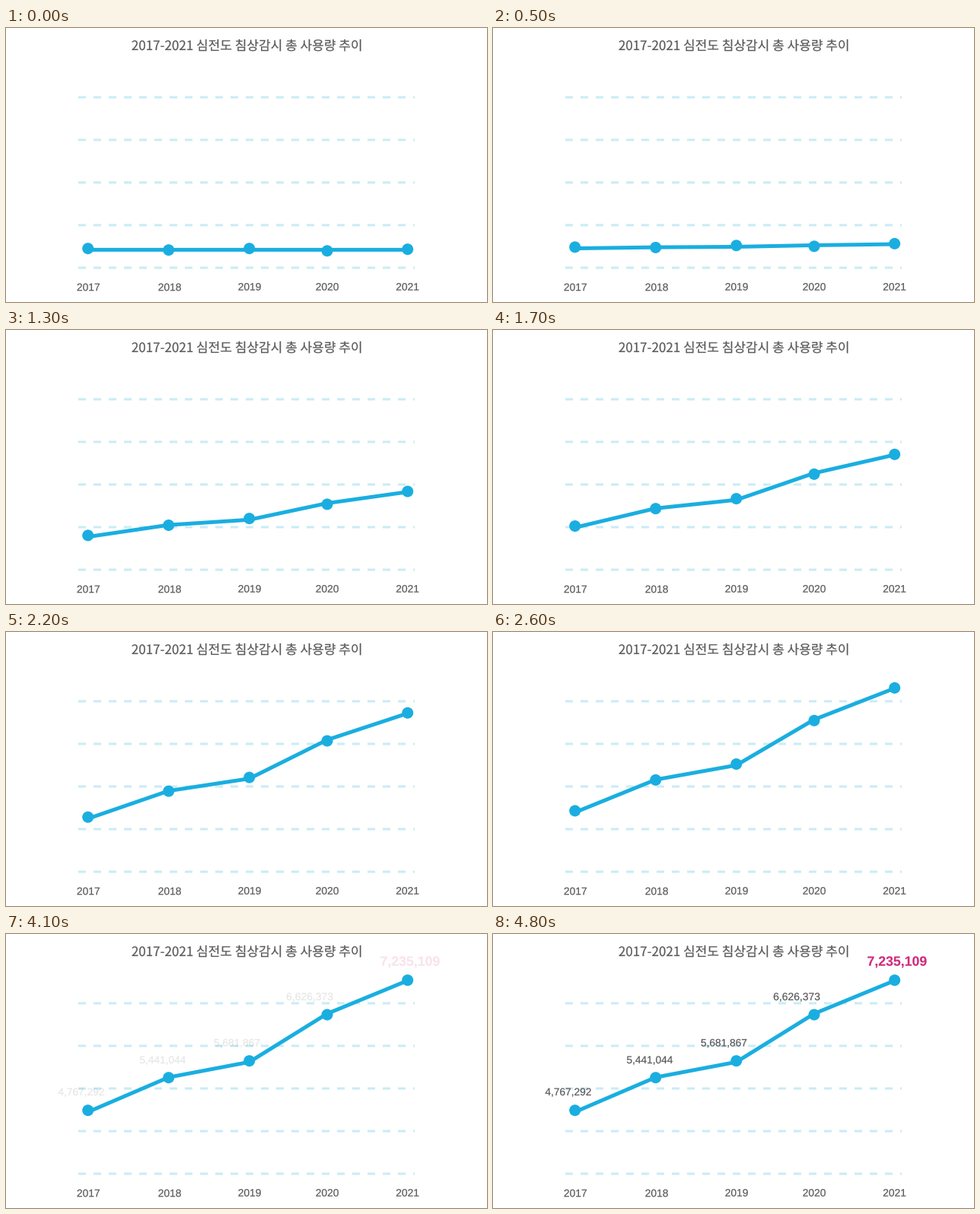
A matplotlib script for the animation above (8 s loop, 632 by 360 pixels).

```python
import numpy as np
import matplotlib.pyplot as plt
from matplotlib.animation import FuncAnimation
from matplotlib.patches import Circle
from matplotlib.patheffects import Stroke

W, H, DPI = 632, 360, 100
STEP, FRAMES = 100, 80
PX = 72 / DPI  # points per pixel

BLUE, PALE, GRAY, PINK = "#1aaee0", "#c9ecf7", "#58595b", "#d12a7b"
HANGUL, LATIN = "Noto Sans CJK JP", "Liberation Sans"

plt.rcParams["text.hinting"] = "none"

X = np.array([107.7, 213.7, 319.7, 422, 527.7])
DOT_FROM = np.array([289.7, 291.7, 289.7, 292.8, 290.7])
DOT_TO = np.array([231.7, 188.7, 166.7, 106, 60.7])
LINE_FROM = np.full(5, 291.4)
LINE_TO = np.array([233.8, 188.3, 168.2, 104.7, 61.2])

fig = plt.figure(figsize=(W / DPI, H / DPI), dpi=DPI, facecolor="white")
ax = fig.add_axes([0, 0, 1, 1])
ax.set_xlim(0, W)
ax.set_ylim(H, 0)
ax.axis("off")


def label(x, y, text, size, font=LATIN, color=GRAY, weight="normal", stroke=0.2):
    t = ax.text(x, y, text, fontsize=size * PX, family=font, color=color,
                weight=weight, ha="center", va="baseline", zorder=5)
    t.set_path_effects([Stroke(linewidth=stroke * PX, foreground=color)])
    return t


# Dashed grid
for y in range(91, 316, 56):
    for x in range(95, 537, 20):
        ax.plot([x, min(x + 10, 537)], [y, y], color=PALE, lw=3 * PX,
                solid_capstyle="butt", snap=False, zorder=1)

label(316.7, 29, "2017-2021 심전도 침상감시 총 사용량 추이", 17, HANGUL)

for x, y, year in zip([108.2, 215, 320, 422, 527.5],
                      [345.2, 345.2, 344.7, 344.7, 344.7], range(2017, 2022)):
    label(x, y, str(year), 13.8)

values = [
    label(99, 212, "4,767,292", 13.7),
    label(206, 170, "5,441,044", 13.7),
    label(303.5, 147.5, "5,681,867", 13.7),
    label(399, 87, "6,626,373", 13.9),
    label(531, 41.7, "7,235,109", 17.7, color=PINK, weight="bold", stroke=0.1),
]

line, = ax.plot(X, LINE_FROM, color=BLUE, lw=5 * PX, solid_joinstyle="round",
                solid_capstyle="butt", snap=False, zorder=2)
dots = [ax.add_patch(Circle(p, 7.5, color=BLUE, lw=0, zorder=3))
        for p in zip(X, DOT_FROM)]


def ramp(t, start, end):
    return min(max((t - start) / (end - start), 0), 1)


def draw(i):
    t = i * STEP
    u = ramp(t, 200, 3000)
    e = u * u * (3 - 2 * u)
    line.set_ydata(LINE_FROM + (LINE_TO - LINE_FROM) * e)
    for dot, p in zip(dots, zip(X, DOT_FROM + (DOT_TO - DOT_FROM) * e)):
        dot.center = p
    alpha = ramp(t, 4000, 4800)
    for v in values:
        v.set_alpha(alpha)
        v.set_visible(alpha > 0)
    return [line, *dots, *values]


anim = FuncAnimation(fig, draw, frames=FRAMES, interval=STEP,
                     repeat=True, repeat_delay=0, blit=False)
plt.show()
```
